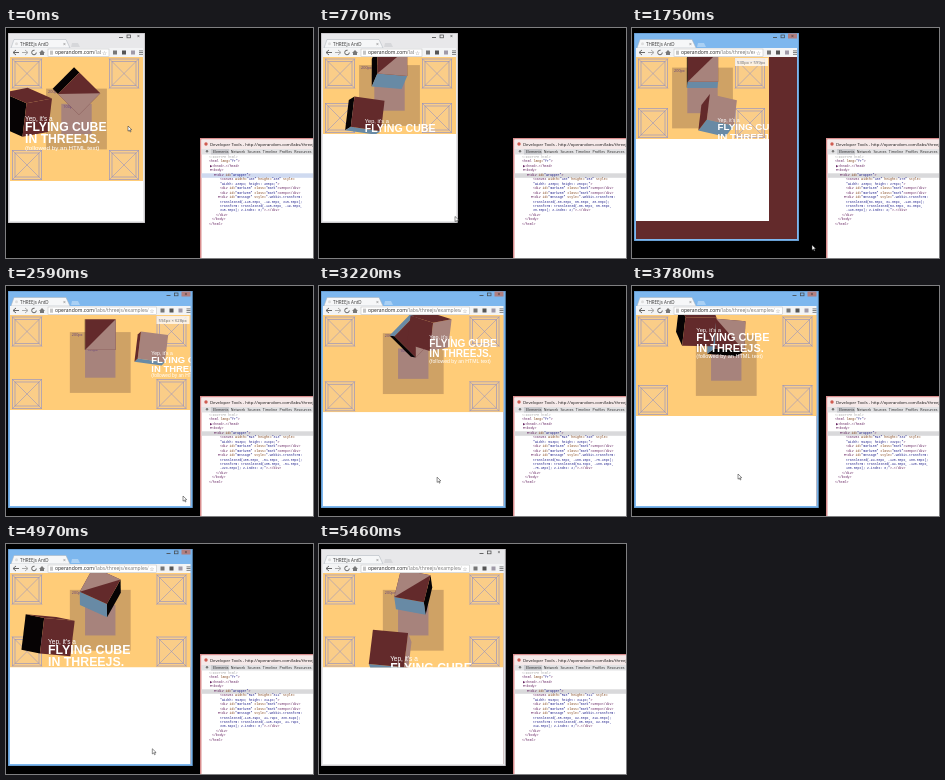
These frames come from a looping animation (307 px wide and 230 px high, 5.53 s). An HTML page with a canvas:

```html
<!DOCTYPE html>
<html lang="en">
<head>
<meta charset="utf-8">
<title>Flying cube</title>
<style>
html, body { margin: 0; width: 100%; height: 100%; overflow: hidden; background: #000; }
canvas { display: block; width: 307px; height: 230px; }
</style>
</head>
<body>
<canvas id="stage" width="307" height="230"></canvas>
<script>
const ctx = document.getElementById('stage').getContext('2d');
const LOOP = 5530, STEP = 70, ORBIT = 4500, SCALE = 0.304, DEPTH = 2200;
const SANS = '"Open Sans", "Noto Sans", sans-serif';
const ARIAL = '"Liberation Sans", Arial, sans-serif';
const MONO = '"Liberation Mono", monospace';
const RED = '#632a2b', BLACK = '#060304', MAUVE = '#a7837c', BLUE = '#688aa5';

// Time, then the x, y, z the flying cube passes through
const FLIGHT = [
  [0, -145, -19, 315], [770, -80, 65, 30], [1750, 53, 61, -148], [2590, 185, -51, -223],
  [3780, -94, -128, 100], [4480, -197, -14, 322], [5460, -65, 92, 319]
];
const POINTER = [
  [0, 122, 98], [560, 136, 188], [1450, 136, 190], [1750, 180, 217], [2590, 177, 210],
  [2900, 125, 193], [3780, 106, 188], [4700, 110, 192], [5250, 184, 218]
];

function segment(t, keys) {
  let i = 0;
  while (i < keys.length - 2 && t >= keys[i + 1][0]) i++;
  return i;
}

// Smooth curve through column c of the keys
function curve(t, keys, c) {
  const i = segment(t, keys), last = keys.length - 1;
  const slope = k => {
    const a = keys[Math.max(0, k - 1)], b = keys[Math.min(last, k + 1)];
    return (b[c] - a[c]) / (b[0] - a[0]);
  };
  const a = keys[i], b = keys[i + 1], d = b[0] - a[0], u = (t - a[0]) / d;
  return a[c] + (b[c] - a[c]) * u * u * (3 - 2 * u) +
    d * u * (1 - u) * (slope(i) * (1 - u) - slope(i + 1) * u);
}

// Straight segments through column c of the keys
function line(t, keys, c = 1) {
  const i = segment(t, keys), a = keys[i], b = keys[i + 1];
  return a[c] + (b[c] - a[c]) * Math.min(1, Math.max(0, (t - a[0]) / (b[0] - a[0])));
}

function rect(x, y, w, h, fill) {
  ctx.fillStyle = fill;
  ctx.fillRect(x, y, w, h);
}

function frame(x, y, w, h, stroke, width = 0.5) {
  ctx.strokeStyle = stroke;
  ctx.lineWidth = width;
  ctx.strokeRect(x, y, w, h);
}

function dot(x, y, r, fill) {
  ctx.beginPath();
  ctx.arc(x, y, r, 0, 7);
  ctx.fillStyle = fill;
  ctx.fill();
}

function path(points, fill, stroke, width = 0.7) {
  ctx.beginPath();
  points.forEach(([x, y]) => ctx.lineTo(x, y));
  if (fill) { ctx.closePath(); ctx.fillStyle = fill; ctx.fill(); }
  if (stroke) { ctx.strokeStyle = stroke; ctx.lineWidth = width; ctx.stroke(); }
}

// Draws text and returns its width
function text(s, x, y, size, fill, family = SANS, weight = '') {
  ctx.font = `${weight} ${size}px ${family}`;
  ctx.fillStyle = fill;
  ctx.fillText(s, x, y);
  return ctx.measureText(s).width;
}

function clipped(x, y, w, h, draw) {
  ctx.save();
  ctx.beginPath();
  ctx.rect(x, y, w, h);
  ctx.clip();
  draw();
  ctx.restore();
}

// Face colours as [negative side, positive side] for x, y and z
const NEAR = [[BLACK, MAUVE], [RED, BLUE], [MAUVE, RED]];
const FAR = [[BLACK, MAUVE], [BLUE, BLUE], [MAUVE, RED]];

function cube(x, y, size, { yaw, pitch, roll }, colors, corner) {
  const spin = (a, b, r) =>
    [a * Math.cos(r) - b * Math.sin(r), a * Math.sin(r) + b * Math.cos(r)];
  const turn = ([px, py, pz]) => {
    [pz, px] = spin(pz, px, yaw);
    [pz, py] = spin(pz, py, pitch);
    [px, py] = spin(px, py, roll);
    return [px, py, pz];
  };
  colors.forEach((pair, axis) => pair.forEach((color, k) => {
    const side = k * 2 - 1, normal = [0, 0, 0];
    normal[axis] = side;
    if (turn(normal)[2] <= 0.01) return;
    const quad = [[-1, -1], [1, -1], [1, 1], [-1, 1]].map(p => {
      const v = [...p];
      v.splice(axis, 0, side);
      const [px, py] = turn(v);
      return [x + px * size / 2, y + py * size / 2];
    });
    path(quad, color);
    if (corner && axis === 2) path(quad.slice(1), corner);
  }));
}

function marker(x, y) {
  const s = 30, ink = 'rgba(140,140,195,.75)';
  rect(x, y, s, s, 'rgba(240,205,165,.35)');
  frame(x + 0.5, y + 0.5, s - 1, s - 1, ink, 0.8);
  frame(x + 3, y + 3, s - 6, s - 6, ink, 0.8);
  path([[x, y], [x + s, y + s]], null, ink);
  path([[x + s, y], [x, y + s]], null, ink);
}

function mark(cx, cy, size, fill, label) {
  rect(cx - size / 2, cy - size / 2, size, size, fill);
  text(label, cx - size / 2 + 2, cy - size / 2 + 4, 3.8, '#65437c');
}

function message(x, y, s) {
  text("Yep, it's a", x, y - s * 0.85, s * 0.53, '#fff', ARIAL);
  text('FLYING CUBE', x, y, s, '#fff', ARIAL, 'bold');
  text('IN THREEJS.', x, y + s * 0.97, s, '#fff', ARIAL, 'bold');
  text('(followed by an HTML text)', x, y + s * 1.53, s * 0.51, '#fff', ARIAL);
}

function scene(t, w, h) {
  const cx = 4 + w / 2, cy = 29 + h / 2, a = 2 * Math.PI * t / ORBIT;
  const zoom = 1 / (1 - curve(t, FLIGHT, 3) / DEPTH);
  const x = cx + curve(t, FLIGHT, 1) * SCALE * zoom;
  const y = cy + curve(t, FLIGHT, 2) * SCALE * zoom;
  clipped(4, 29, w, h, () => {
    rect(4, 29, w, h, '#ffcc78');
    for (const mx of [6, w - 30]) for (const my of [30.5, h - 2]) marker(mx, my);
    mark(cx, cy, 200 * SCALE, '#cfa265', '200px');
    mark(cx, cy, 100 * SCALE, MAUVE, '100px');
    cube(cx, cy - 28, 100 * SCALE, {
      yaw: 0.25 * Math.cos(a / 2) ** 2,
      pitch: line(t, [[0, 0], [770, -0.45], [2590, 0], [4480, 0.4]]),
      roll: line(t, [[0, 0.78], [770, 0], [2590, 0], [4480, -2.36], [5460, -2.9]])
    }, FAR, MAUVE);
    cube(x, y, 100 * SCALE * zoom, {
      yaw: -0.4 + 1.2 * Math.cos(a), pitch: 0.45 * Math.cos(a + 0.8), roll: 0.12
    }, NEAR);
    message(x, y + 16 * zoom, 10.45 * zoom);
  });
}

function browser(t, w, h) {
  const right = 2 + w, end = right - 36, active = t >= 1260 && t < 5250;
  rect(2, 5, w, h, active ? '#7db7ee' : '#e8e8ea');
  frame(2.3, 5.3, w - 0.6, h - 0.6, active ? '#5a8fc4' : '#b9b6ba', 0.6);
  path([[5, 20], [8, 11.5], [60, 11.5], [64, 20]], '#f6f7f8', '#a9b0b8', 0.5);
  dot(10.5, 15.8, 1.5, '#ddd');
  text('THREEjs AntD', 14, 17.5, 4.5, '#333');
  text('×', 57, 17.7, 5, '#777');
  path([[65, 19], [66, 15], [72, 15], [74, 19]], active ? '#a9d0f4' : '#d6d7da');
  // Window buttons
  rect(right - 26, 9, 4, 0.8, '#444');
  frame(right - 18, 7, 3.5, 2.8, '#444', 0.7);
  if (active) rect(right - 11, 5.5, 9, 5, '#b27f80');
  text('×', right - 8, 10, 5, '#333');
  // Toolbar
  rect(4, 20, w - 4, 9, '#f3f4f5');
  [['#666', 10, -1], ['#aaa', 19, 1]].forEach(([ink, x, d]) => {
    path([[x, 22], [x + 3 * d, 24.5], [x, 27]], null, ink, 1);
    path([[x - 3 * d, 24.5], [x + 3 * d, 24.5]], null, ink, 1);
  });
  ctx.beginPath();
  ctx.arc(28, 24.5, 2.3, 0, 5);
  ctx.strokeStyle = '#666';
  ctx.lineWidth = 1;
  ctx.stroke();
  path([[33, 25], [36, 22], [39, 25], [38, 25], [38, 27], [34, 27], [34, 25]], '#777');
  rect(42, 21, end - 42, 7.5, '#fff');
  frame(42, 21, end - 42, 7.5, '#bbb');
  rect(44, 22.7, 3, 4, '#c4c4c4');
  clipped(42, 20, end - 50, 9, () => {
    const off = text('operandom.com', 49, 26.4, 5, '#222');
    text('/labs/threejs/examples/cube', 49 + off, 26.4, 5, '#777');
  });
  text('☆', end - 7, 26.8, 5.5, '#777', '"DejaVu Sans", sans-serif');
  ['#777', '#555', '#a09aa8'].forEach((c, i) => rect(end + 4 + i * 9, 22.5, 4, 4, c));
  for (let i = 0; i < 3; i++) rect(right - 6, 22.5 + i * 1.7, 4, 0.8, '#666');
}

function wrap(s, max) {
  const rows = [''];
  for (const word of s.split(' ')) {
    const k = rows.length - 1, joined = rows[k] ? rows[k] + ' ' + word : word;
    if (rows[k] && joined.length > max) rows.push(word);
    else rows[k] = joined;
  }
  return rows;
}

function devtools(t, w, h) {
  rect(194, 110, 113, 120, '#d98e8e');
  rect(195.5, 111.5, 112, 119, '#fff');
  rect(195.5, 111.5, 112, 9.5, '#f5e9e9');
  dot(200, 116, 1.7, '#cf5b50');
  text('Developer Tools - http://operandom.com/labs/threejs/examples/', 204, 117.7, 4.25, '#111');
  rect(195.5, 121, 112, 5.5, '#e2e2e4');
  rect(205, 121, 18, 5.5, '#cbccd0');
  dot(201, 123.3, 1.2, '#777');
  let tab = 207;
  for (const s of ['Elements', 'Network', 'Sources', 'Timeline', 'Profiles', 'Resources']) {
    tab += text(s, tab, 125, 3.6, '#222') + 2.3;
  }

  const shift = 'translate3d(' +
    [1, 2, 3].map(c => curve(t, FLIGHT, c).toFixed(2) + 'px').join(', ') + ');';
  const cw = w > 150 ? 593 : 430, ch = Math.round(h / SCALE);
  const style = `▼<div id="message" style="-webkit-transform: ${shift} transform: ${shift} ` +
    `z-index: ${curve(t, FLIGHT, 3) > 50 ? 6 : 2};">…</div>`;
  const rows = [
    [203, '<!DOCTYPE html>'], [203, '<html lang="fr">'], [204, '▶<head>…</head>'],
    [204, '▼<body>'], [208, '▼<div id="wrapper">'],
    [214, `<canvas width="${cw}" height="${ch}" style=`],
    [214, `"width: ${cw}px; height: ${ch}px;">`],
    [214, '<div id="mark100" class="mark">100px</div>'],
    [214, '<div id="mark200" class="mark">200px</div>'],
    ...wrap(style, 44).map((s, i) => [i ? 214 : 212, s]),
    [210, '</div>'], [206, '</body>'], [203, '</html>']
  ];
  rect(195.5, 145.3, 112, 4.5, t < 420 ? '#cfdaf0' : '#d9d9db');
  let quoted = false;
  rows.forEach(([x, row], i) => {
    for (const part of row.split(/("|[\w-]+=)/)) {
      const color = i === 0 ? '#aaa' : quoted || part === '"' ? '#22228c'
        : part.endsWith('=') ? '#7d3c10' : '#64205f';
      x += text(part, x, 130 + i * 4.45, 3.2, color, MONO);
      if (part === '"') quoted = !quoted;
    }
  });
}

function cursor(t) {
  if (t >= 5320) return;
  const x = line(t, POINTER, 1), y = line(t, POINTER, 2);
  const shape = [[0, 0], [0, 5.2], [1.3, 4.1], [2.2, 6], [3, 5.6], [2.2, 3.8], [3.8, 3.7], [0, 0]];
  path(shape.map(([a, b]) => [x + a, y + b]), '#fff', '#222', 0.5);
}

function sizeHint(right, w, h) {
  rect(right - 34, 30, 33, 8, 'rgba(255,255,255,.75)');
  const label = `${Math.round((w - 4) / SCALE)}px × ${Math.round((h - 26) / SCALE)}px`;
  text(label, right - 32, 35.7, 4.2, '#666');
}

function draw(t) {
  const w = line(t, [[1480, 137], [1750, 165], [2050, 184.5]]);
  const h = line(t, [[1480, 190], [1750, 208], [2050, 217]]);
  // The page is repainted only once the resize ends
  const [pageW, pageH] = t < 2030 ? [133, 164] : [w - 4, h - 26];
  const sceneH = line(t, [[0, 124], [770, 77], [1750, 82], [2100, 95], [2870, 95],
    [3780, 101], [4480, 94.5]]);
  rect(0, 0, 307, 230, '#000');
  browser(t, w, h);
  rect(4, 29, w - 4, h - 26, RED);
  rect(4, 29, pageW, pageH, '#fff');
  scene(t, pageW, sceneH);
  if (t >= 1500 && t < 2870) sizeHint(4 + pageW, w, h);
  devtools(t, pageW, sceneH);
  cursor(t);
}

const start = performance.now();
function tick() {
  const t = (performance.now() - start) % LOOP;
  draw(Math.floor(t / STEP) * STEP);
  requestAnimationFrame(tick);
}
tick();
</script>
</body>
</html>
```
